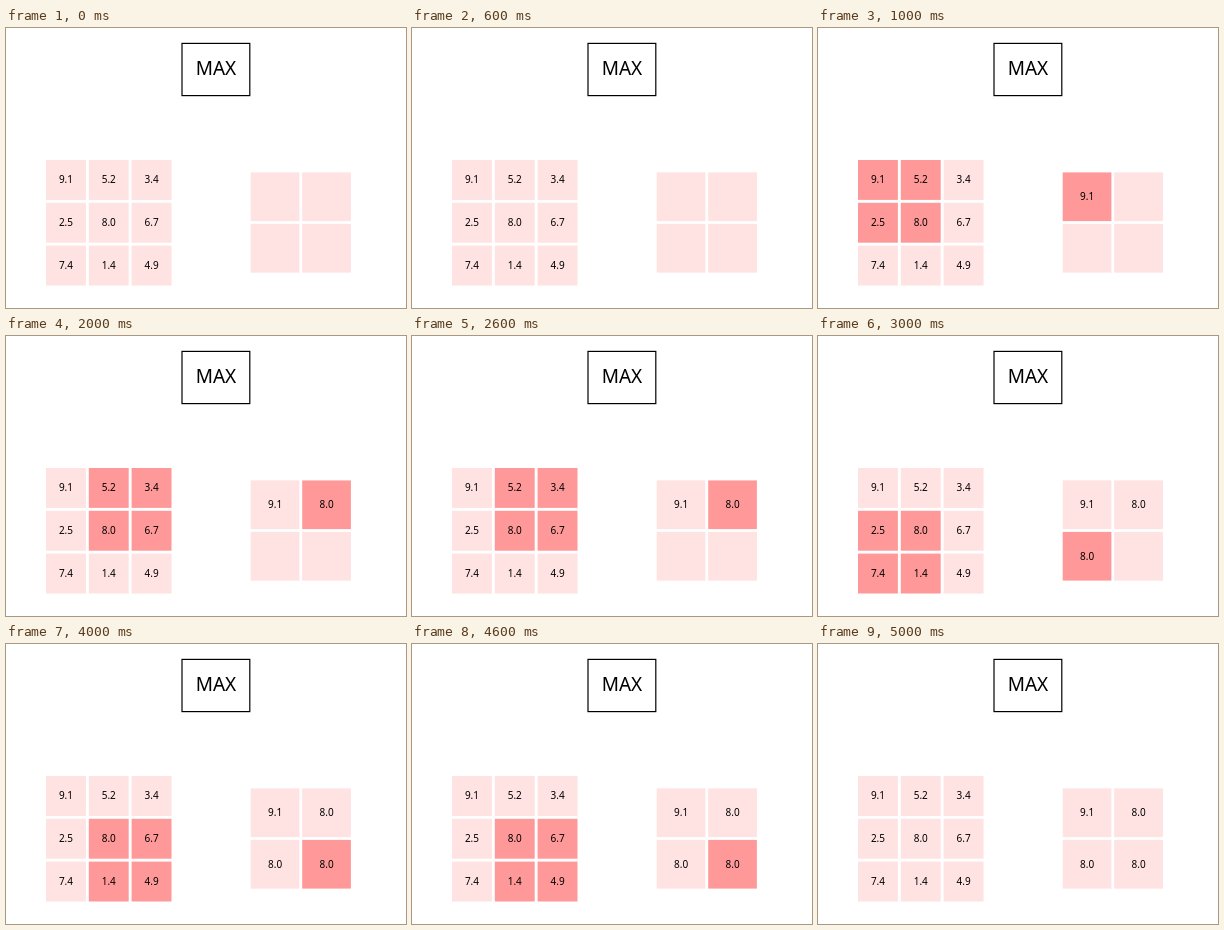
An HTML page that plays this animation: 400 by 280 pixels, repeating every 6000 ms.

```html
<!DOCTYPE html>
<html lang="en">
<head>
<meta charset="utf-8">
<title>Max pooling</title>
<style>
  html, body { margin: 0; width: 100%; height: 100%; overflow: hidden; background: #fff; }
  svg { display: block; width: 400px; height: 280px; }
  text { font: 10px "Noto Sans", "Open Sans", sans-serif; text-anchor: middle; fill: #000; }
  .title { font-size: 19px; }
</style>
</head>
<body>
<svg viewBox="0 0 400 280">
  <rect x="176" y="15.4" width="67.8" height="52.2" fill="none" stroke="#000" stroke-width="1.2"/>
  <text class="title" x="210" y="47">MAX</text>
</svg>
<script>
const PALE = '#ffe2e2', ACTIVE = '#ff9898';
const STEP = 1000, STEPS = 6;
const input = [[9.1, 5.2, 3.4], [2.5, 8.0, 6.7], [7.4, 1.4, 4.9]];
const svg = document.querySelector('svg');

function add(tag, attributes) {
  const node = document.createElementNS('http://www.w3.org/2000/svg', tag);
  for (const name in attributes) node.setAttribute(name, attributes[name]);
  return svg.appendChild(node);
}

function makeGrid(count, left, top, size, pitch) {
  return Array.from({ length: count * count }, (_, i) => {
    const col = i % count, row = Math.floor(i / count);
    const x = left + col * pitch, y = top + row * pitch;
    return {
      col, row,
      box: add('rect', { x, y, width: size, height: size }),
      label: add('text', { x: x + size / 2, y: y + size / 2 + 3.5 })
    };
  });
}

const inputCells = makeGrid(3, 40, 132, 39.9, 42.8);
const outputCells = makeGrid(2, 244.7, 144.4, 48.7, 51.5);

const inWindow = (cell, { col, row }) =>
  cell.col >= col && cell.col <= col + 1 && cell.row >= row && cell.row <= row + 1;

const valueOf = cell => input[cell.row][cell.col];

for (const cell of inputCells) cell.label.textContent = valueOf(cell).toFixed(1);
for (const cell of outputCells) {
  cell.max = Math.max(...inputCells.filter(c => inWindow(c, cell)).map(valueOf)).toFixed(1);
}

function draw(time) {
  const current = Math.floor(time / STEP) % STEPS - 1;
  const target = outputCells[current];
  for (const cell of inputCells) {
    cell.box.setAttribute('fill', target && inWindow(cell, target) ? ACTIVE : PALE);
  }
  outputCells.forEach((cell, i) => {
    cell.box.setAttribute('fill', i === current ? ACTIVE : PALE);
    cell.label.textContent = i <= current ? cell.max : '';
  });
}

const start = performance.now();
function tick() {
  draw(performance.now() - start);
  requestAnimationFrame(tick);
}
tick();
</script>
</body>
</html>
```
